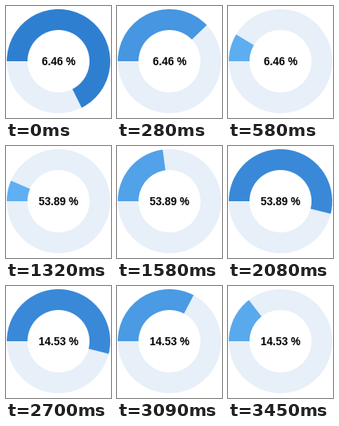
Write a matplotlib script that moves like this. It is 132 by 140 pixels and loops after 4500 ms.

```python
import numpy as np
import matplotlib.pyplot as plt
from matplotlib.animation import FuncAnimation
from matplotlib.patches import Wedge

W, H, DPI = 132, 140, 100
LOOP, TICK = 4500, 10
CENTER, OUTER, INNER = (66, 69), 65, 39
LOW = np.array([100, 180, 245]) / 255
HIGH = np.array([21, 101, 192]) / 255
TRACK = (231 / 255, 239 / 255, 249 / 255)

# Gauge percentage over time: straight sweeps with rests between them
KEY_MS = [0, 280, 520, 602, 1320, 2035, 2700, 3425]
KEY_PCT = [67.6, 37.8, 14.4, 6.46, 6.46, 53.89, 53.89, 14.53]
LABELS = [(2700, "14.53 %"), (1320, "53.89 %"), (0, "6.46 %")]

# The gauge repaints at these moments and holds in between
REPAINTS = np.concatenate([
    [0],
    np.linspace(50, 280, 6),
    np.linspace(328, 520, 5),
    [580, 640],
    [1320], np.linspace(1350, 1840, 10),
    np.linspace(1900, 2080, 4),
    [2700], np.linspace(2760, 3090, 9),
    [3120, 3180],
    np.linspace(3230, 3450, 5),
])


def gauge_value(ms):
    shown = REPAINTS[np.searchsorted(REPAINTS, ms, side="right") - 1]
    return np.interp(shown, KEY_MS, KEY_PCT) / 100


def label_at(ms):
    return next(text for start, text in LABELS if ms >= start)


def ring(start, end, color):
    return ax.add_patch(Wedge(CENTER, OUTER, start, end, width=OUTER - INNER,
                              facecolor=color, linewidth=0))


fig = plt.figure(figsize=(W / DPI, H / DPI), dpi=DPI, facecolor="white")
ax = fig.add_axes([0, 0, 1, 1])
ax.set_xlim(0, W)
ax.set_ylim(H, 0)
ax.axis("off")

ring(0, 360, TRACK)
arc = ring(180, 270, LOW)
label = ax.text(66, 74, "", ha="center", va="baseline", color="black",
                family="Liberation Sans", weight="bold",
                fontsize=13.6 * 72 / DPI)


def draw(i):
    ms = i * TICK
    value = gauge_value(ms)
    arc.set_theta2(180 + 360 * value)
    arc.set_facecolor(LOW + (HIGH - LOW) * value)
    label.set_text(label_at(ms))
    return arc, label


anim = FuncAnimation(fig, draw, frames=LOOP // TICK, interval=TICK,
                     repeat=True, repeat_delay=0, blit=False)
plt.show()
```
